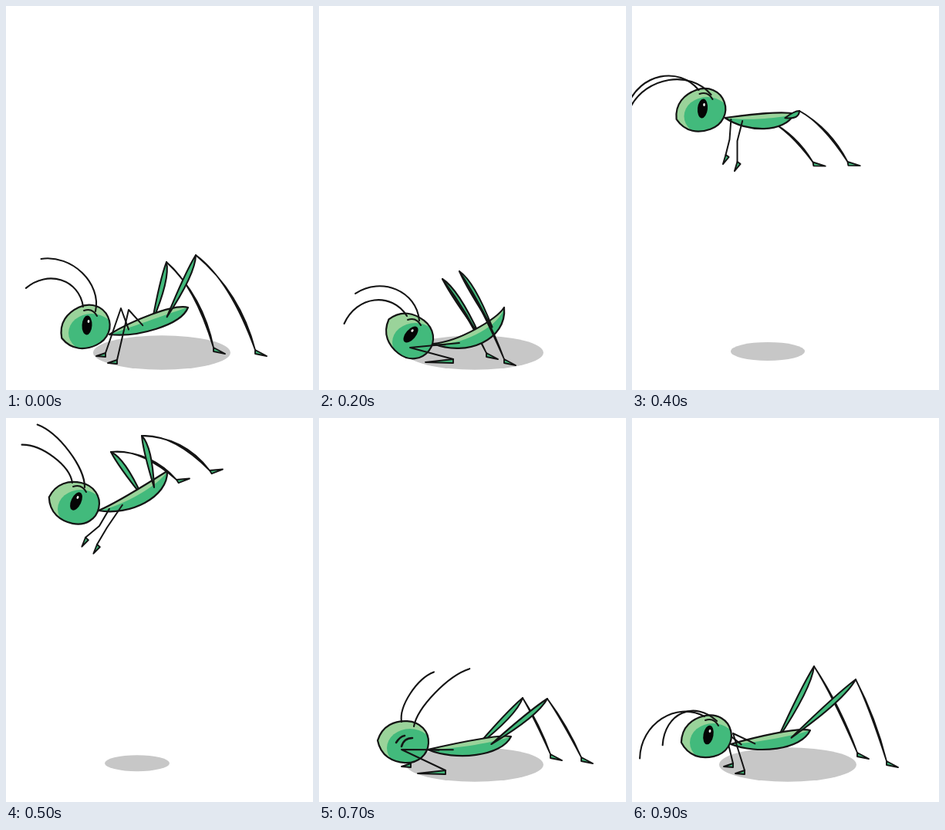
Animation, 398 px wide and 498 px high, one loop 1000 ms. Source, as an HTML page with a canvas:

```html
<!DOCTYPE html>
<html lang="en">
<head>
<meta charset="utf-8">
<title>Grasshopper</title>
<style>
html, body { margin: 0; width: 100%; height: 100%; overflow: hidden; background: #fff; }
canvas { display: block; }
</style>
</head>
<body>
<canvas id="stage" width="398" height="498"></canvas>
<script>
const ctx = document.getElementById('stage').getContext('2d');
const INK = '#141414', LIGHT = '#9ad39a', GREEN = '#42ba7c', SHADE = '#c7c7c7';
const STEP = 100;
const RAD = Math.PI / 180;

// head: x, y, tilt       tail: x, y, sag of the body
// feelers: angle and length of each, shared curl
// legs: knee, ankle      feet: turn of hind and front feet
// hips: front and hind hip along the body
const rest = { shadow: 89, bend: .03, reach: 1, feet: [0, 0], hips: [.28, .68] };

const stand = {
  ...rest, head: [104, 416, -25], tail: [236, 391, 4], feelers: [198, 78, 224, 98, 32],
  near: [246, 323, 323, 446], far: [208, 332, 269, 443], front: [159, 394, 144, 459],
  bend: .08, hips: [.38, .65]
};
const crouch = {
  ...rest, head: [118, 428, 38], tail: [240, 391, 24], feelers: [173, 82, 203, 90, 34],
  near: [182, 344, 240, 458], far: [160, 354, 217, 450], front: [118, 443, 174, 458], reach: 3
};
const leap = {
  ...rest, head: [91, 160, -52], tail: [211, 211, 4], feelers: [119, 106, 109, 110, 57],
  near: [258, 249, 295, 336], far: [217, 252, 248, 325], front: [142, 208, 155, 240],
  shadow: 54, feet: [12, -60], hips: [.2, .92], squint: true
};
const dive = {
  ...rest, head: [90, 110, 12], tail: [209, 69, 15], feelers: [217, 82, 233, 102, 16],
  near: [176, 23, 264, 68], far: [136, 44, 221, 80], front: [131, 142, 118, 164],
  shadow: 42, bend: .12, feet: [-33, -50]
};
const fall = {
  ...rest, head: [98, 277, 33], tail: [184, 206, 28], feelers: [250, 100, 266, 103, 10],
  near: [155, 170, 230, 127], far: [131, 191, 187, 127], front: [137, 324, 125, 357],
  shadow: 54, feet: [-118, 90]
};
const land = {
  ...rest, head: [111, 420, 3], tail: [249, 413, 9], feelers: [303, 77, 314, 104, -14],
  near: [296, 364, 340, 440], far: [264, 363, 300, 436], front: [107, 430, 164, 457],
  reach: 3, squint: true
};
const rise = {
  ...rest, head: [98, 413, -13], tail: [231, 405, 8], feelers: [147, 100, 156, 77, 37],
  near: [290, 339, 330, 445], far: [236, 322, 292, 434], front: [131, 409, 146, 457]
};

const mix = (a, b) => Array.isArray(a) ? a.map((v, i) => mix(v, b[i])) : (a + b) / 2;
const between = (a, b) => Object.fromEntries(
  Object.keys(a).filter(k => k !== 'squint').map(k => [k, mix(a[k], b[k])]));

const poses = [
  stand, between(stand, crouch), crouch,
  leap, between(leap, dive), dive, fall,
  land, between(land, rise), rise
];

const add = (p, x, y) => [p[0] + x, p[1] + y];

// Point at share t of the way from p to q, pushed sideways by off pixels.
function along(p, q, t, off = 0) {
  const dx = q[0] - p[0], dy = q[1] - p[1], len = Math.hypot(dx, dy) || 1;
  return [p[0] + dx * t - dy / len * off, p[1] + dy * t + dx / len * off];
}

// Path from a start point through segments of 1 (line), 2 (quadratic) or 3 (cubic) points.
function shape(start, ...segments) {
  const path = new Path2D();
  path.moveTo(...start);
  for (const s of segments) {
    path[['lineTo', 'quadraticCurveTo', 'bezierCurveTo'][s.length - 1]](...s.flat());
  }
  return path;
}

function paint(path, color, width) {
  if (color) {
    ctx.fillStyle = color;
    ctx.fill(path);
  }
  if (width) {
    ctx.lineWidth = width;
    ctx.stroke(path);
  }
}

function oval(x, y, rx, ry, deg, color) {
  const path = new Path2D();
  path.ellipse(x, y, rx, ry, deg * RAD, 0, Math.PI * 2);
  paint(path, color);
}

// Runs fn in a moved and turned frame.
function placed([x, y], deg, fn) {
  ctx.save();
  ctx.translate(x, y);
  ctx.rotate(deg * RAD);
  fn();
  ctx.restore();
}

function foot(ankle, deg, toe) {
  placed(ankle, deg, () => paint(shape([0, 0], [toe], [[0, 5]], [[0, 0]]), GREEN, 1.9));
}

function frontLeg(hip, knee, ankle, deg, reach) {
  paint(shape(hip, [knee], [ankle]), null, 2);
  foot(ankle, deg, [-12 * reach, 4]);
}

function hindLeg(hip, [kx, ky, ax, ay], bend, deg) {
  const knee = [kx, ky], ankle = [ax, ay];
  const side = -2 * bend * Math.hypot(ax - kx, ay - ky);
  paint(shape(hip, [along(hip, knee, .7, -3), knee], [along(hip, knee, .75, 10), hip]), GREEN, 2.1);
  paint(shape(knee, [along(knee, ankle, .5, side), ankle],
    [along(knee, ankle, .35, side + 3), knee]), INK, 1.8);
  foot(ankle, deg, [15, 8]);
}

// Both control points of a body edge; off shifts the edge from the middle line.
const edge = (neck, tail, sag, off) =>
  [along(neck, tail, .3, sag + off * .75), along(neck, tail, .85, sag + off)];

function spine(neck, tail, sag, t) {
  const [a, b] = edge(neck, tail, sag, 0), u = 1 - t;
  return [0, 1].map(i => u * u * u * neck[i] + 3 * u * u * t * a[i] + 3 * u * t * t * b[i] + t * t * t * tail[i]);
}

function drawBody(neck, tail, sag) {
  const [b1, b2] = edge(neck, tail, sag, 15);
  const leaf = top => shape(neck, [...edge(neck, tail, sag, top), tail], [b2, b1, neck]);
  paint(leaf(-15), LIGHT);
  paint(leaf(-5), GREEN);
  paint(leaf(-15), null, 2.2);
}

function drawHead([x, y, tilt], squint) {
  placed([x, y], tilt, () => {
    const skull = shape([-35, 0],
      [[-30, -20], [-14, -27], [2, -27]], [[19, -27], [31, -15], [31, 0]],
      [[31, 15], [19, 27], [2, 27]], [[-14, 27], [-30, 20], [-35, 0]]);
    paint(skull, LIGHT);
    ctx.save();
    ctx.clip(skull);
    ctx.rotate(-tilt * RAD);
    oval(7, 8, 30, 25, 0, GREEN);
    ctx.restore();
    paint(skull, null, 2.2);
  });
  placed([x, y], 0, () => {
    if (squint) {
      paint(shape([-11, 1], [[-6, -7], [0, -8]]), null, 2.6);
      paint(shape([-4, 6], [[-1, -5], [10, -5]]), null, 2.6);
      return;
    }
    const lean = 18 + tilt * .6;
    oval(1, -2, 6.5, 12.5, lean, '#050505');
    oval(3, -7, 1.4, 2, lean, '#e8efe8');
    paint(shape([-3, -21], [[8, -25], [14, -14]]), null, 2);
  });
}

function feeler(base, deg, len, curl) {
  const tip = add(base, len * Math.cos(deg * RAD), len * Math.sin(deg * RAD));
  paint(shape(base, [along(base, tip, .2, curl), along(base, tip, .75, curl), tip]), null, 2.1);
}

function drawShadow(r) {
  const left = 128 - Math.max(0, r - 54) * .43;
  oval(left + r, 446 + r * .04, r, r * .25, 0, SHADE);
}

function draw(pose) {
  const { head, near, far, front, feelers, hips, feet, bend, reach } = pose;
  const [tx, ty, sag] = pose.tail;
  const neck = add(head, 30, 10), tail = [tx, ty];
  const hip = t => spine(neck, tail, sag, t);
  const knee = front.slice(0, 2), ankle = front.slice(2);

  ctx.fillStyle = '#fff';
  ctx.fillRect(0, 0, 398, 498);
  ctx.strokeStyle = INK;
  ctx.lineCap = ctx.lineJoin = 'round';

  drawShadow(pose.shadow);
  hindLeg(hip(hips[1] - .17), far, bend, feet[0]);
  drawBody(neck, tail, sag);
  hindLeg(hip(hips[1]), near, bend, feet[0]);
  frontLeg(hip(hips[0] - .15), add(knee, -10, -2), add(ankle, -15 * reach, -9), feet[1], 1);
  drawHead(head, pose.squint);
  const [a, aLen, b, bLen, curl] = feelers;
  feeler(add(head, -4, -26), a, aLen, curl);
  feeler(add(head, 12, -20), b, bLen, curl);
  frontLeg(hip(hips[0]), knee, ankle, feet[1], reach);
}

function tick(now) {
  draw(poses[Math.floor(now / STEP) % poses.length]);
  requestAnimationFrame(tick);
}
draw(poses[0]);
requestAnimationFrame(tick);
</script>
</body>
</html>
```
